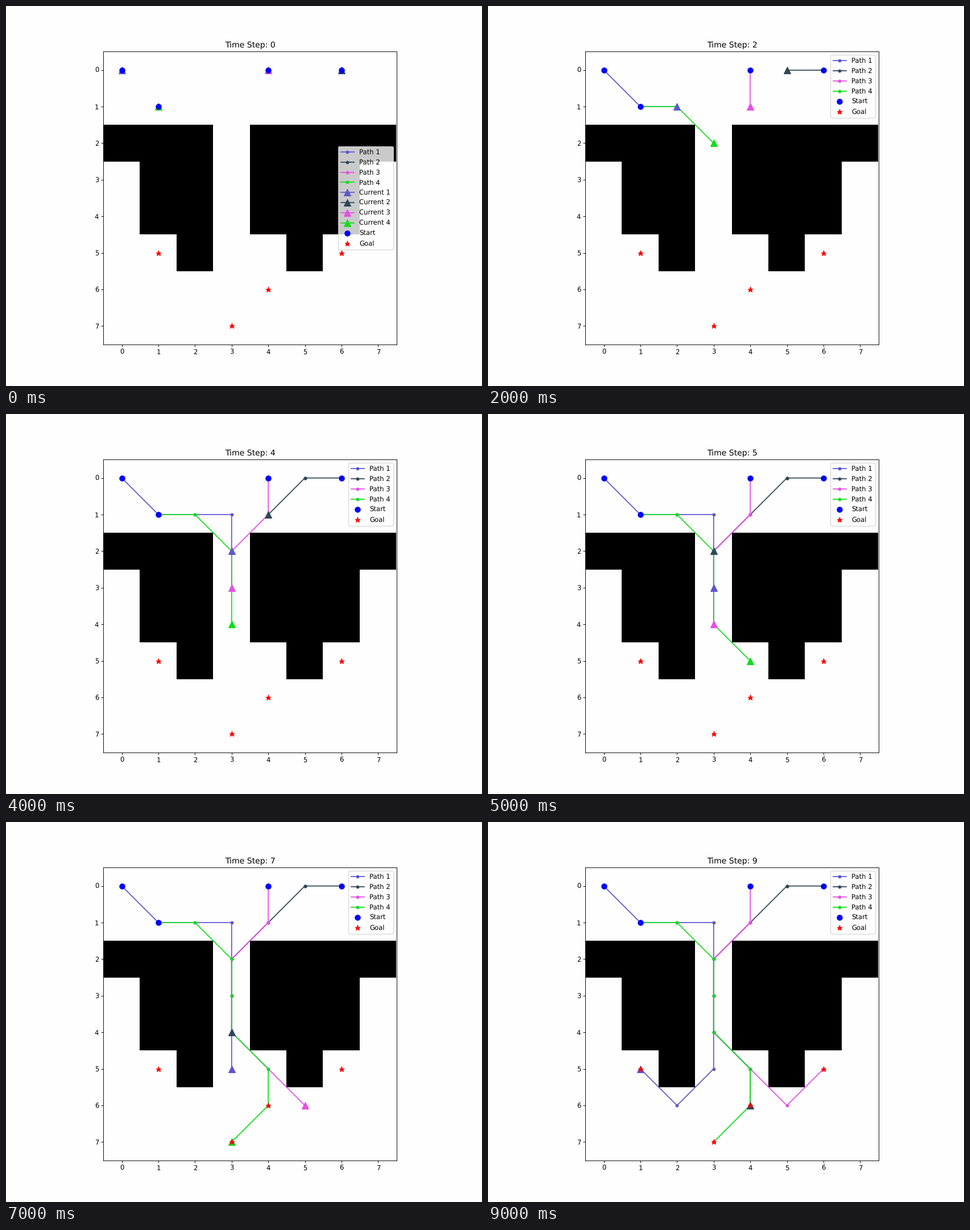
Write a matplotlib script that moves like this. It is 837 px wide and 669 px high and loops after 10 s.

```python
import numpy as np
import matplotlib.pyplot as plt
from matplotlib.animation import FuncAnimation
from matplotlib.colors import ListedColormap

W, H, DPI = 837, 669, 83.7
SIZE, STEPS = 8, 10
PAPER = "#fefefe"

# Colour, start cell and one compass move per step ("." waits)
AGENTS = [
    ("#5d57ce", (0, 0), "SE E E S S S S SW NW"),
    ("#2f4859", (6, 0), "W . . SW SW S S SE S"),
    ("#e54ee5", (4, 0), "S . SW S S SE SE NE"),
    ("#12dd1c", (1, 1), "E SE S S SE S SW"),
]


def walk(start, moves):
    steps = [(("E" in m) - ("W" in m), ("S" in m) - ("N" in m))
             for m in moves.split()]
    return np.cumsum([start] + steps, axis=0)


def make_walls():
    grid = np.zeros((SIZE, SIZE))
    grid[2] = 1
    grid[3:5, 1:7] = 1
    grid[5, 2::3] = 1
    grid[:, 3] = 0    # corridor
    return grid


plt.rcParams.update({
    "font.family": "DejaVu Sans",
    "text.hinting": "none",
    "axes.facecolor": PAPER,
    "legend.labelspacing": 0.54,
})

paths = [walk(start, moves) for _, start, moves in AGENTS]
colors = [agent[0] for agent in AGENTS]
walls = make_walls()
edges = np.arange(SIZE + 1) - 0.5
cmap = ListedColormap([PAPER, "black"])

fig, ax = plt.subplots(figsize=((W + 0.01) / DPI, (H + 0.01) / DPI), dpi=DPI,
                       facecolor=PAPER)
fig.subplots_adjust(bottom=0.1097, top=0.8797)


def draw(step):
    ax.clear()
    # The walls sit half a pixel to the left of the axes
    ax.pcolormesh(edges - 0.0065, edges, walls, cmap=cmap)
    ax.set(aspect="equal", xlim=edges[[0, -1]], ylim=edges[[-1, 0]],
           title=f"Time Step: {step}")

    for i, (path, color) in enumerate(zip(paths, colors), 1):
        ax.plot(*path[:step + 1].T, "o-", color=color, markersize=4,
                label=f"Path {i}")

    # An agent leaves the map once its path has ended
    for i, (path, color) in enumerate(zip(paths, colors), 1):
        if step < len(path):
            ax.plot(*path[step:step + 1].T, "^-", color=color, markersize=10,
                    label=f"Current {i}" if step == 0 else None)

    for end, style, label in ((0, "bo", "Start"), (-1, "r*", "Goal")):
        x, y = zip(*(path[end] for path in paths))
        ax.plot(x, y, style, markersize=8, label=label)

    ax.legend(loc="center right" if step == 0 else "upper right")


anim = FuncAnimation(fig, draw, frames=STEPS, interval=1000, repeat=True,
                     repeat_delay=0, cache_frame_data=False)
plt.show()
```
